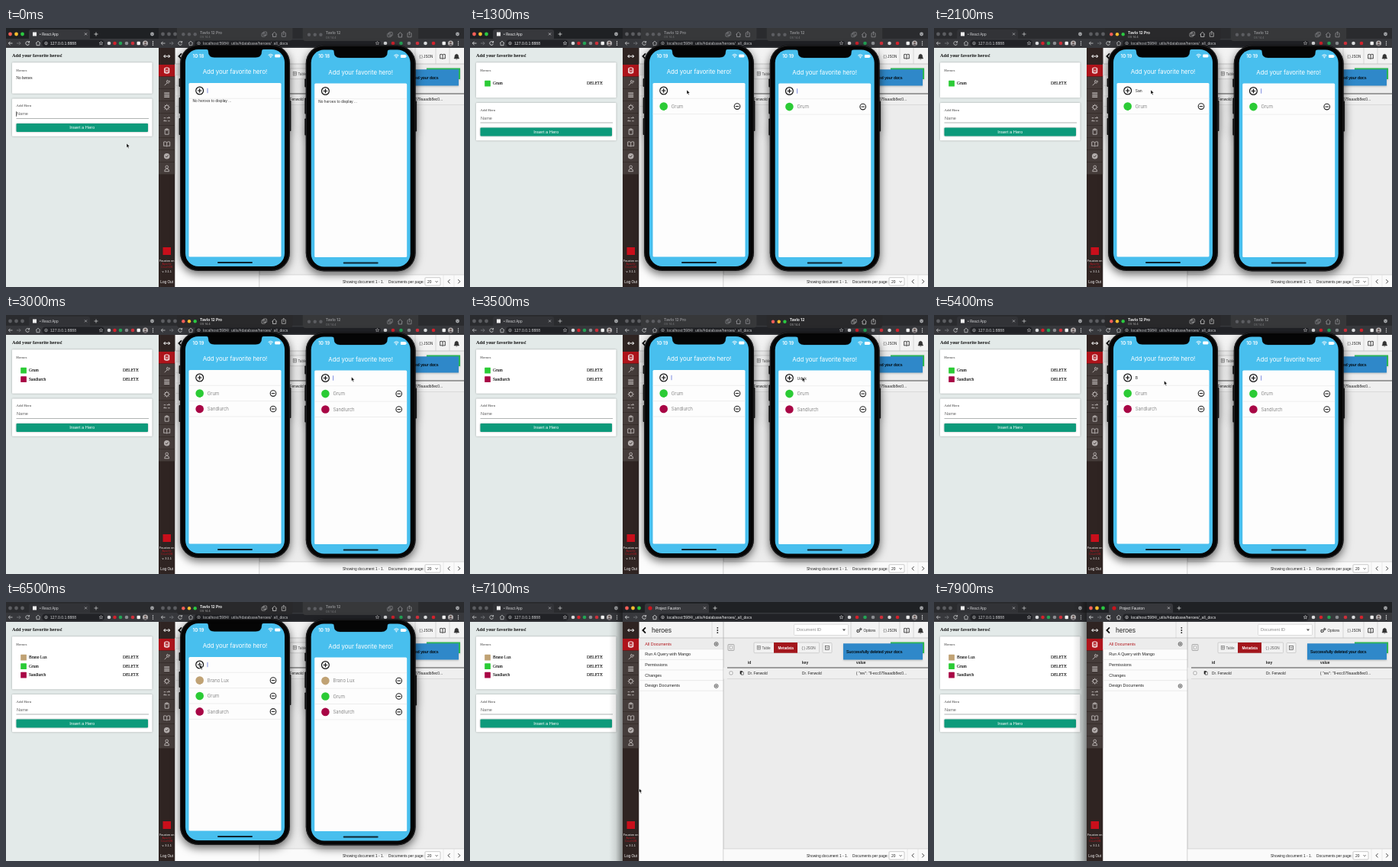
Animation of 600x339 px, one loop 8 s. Source, as an HTML page:

```html
<!DOCTYPE html>
<html lang="en">
<head>
<meta charset="utf-8">
<title>Hero list sync</title>
<style>
  html, body { margin: 0; width: 100%; height: 100%; overflow: hidden; background: #e3eae9; }
  svg { display: block; width: 600px; height: 339px; }
  text { font-family: "Liberation Sans", Arial, sans-serif; white-space: pre; }
  .serif text { font-family: "Liberation Serif", Times, serif; }
  .phone text { font-family: Inter, "Liberation Sans", sans-serif; }
  .card { filter: drop-shadow(0 .6px .8px rgba(0,0,0,.3)); }
  .body { filter: drop-shadow(0 4px 6px rgba(0,0,0,.6)); }
  .toast { filter: drop-shadow(0 1px 1px rgba(0,0,0,.2)); }
</style>
</head>
<body>
<svg id="stage" viewBox="0 0 600 339"></svg>
<script>
const LOOP = 8000, STEP = 100;
const stage = document.getElementById('stage');

// Timeline
const heroes = [
  { name: 'Brano Lux', color: '#c0a274', from: 6400, to: LOOP },
  { name: 'Grum', color: '#2bcb35', from: 1000, to: LOOP },
  { name: 'Sandlurch', color: '#a80645', from: 2800, to: LOOP },
  { name: 'Udek', color: '#4baed2', from: 3700, to: 4700 }
];
const typing = [
  { where: 'web', text: 'Grum', from: 200, pace: 150, to: 1000 },
  { where: 'p1', text: 'Sandlurch', from: 1900, pace: 80, to: 2800 },
  { where: 'p2', text: 'Udek', from: 3200, pace: 100, to: 3700 },
  { where: 'p1', text: 'Brano Lux', from: 5400, pace: 100, to: 6400 }
];
const focus = [[0, 'web'], [1400, 'p1'], [3100, 'p2'], [5100, 'p1'], [6900, 'fx']];
const mouse = [
  [0, 158, 151], [500, 158, 151], [800, 110, 130], [1000, 110, 130],
  [1300, 284, 81], [2300, 284, 81], [2600, 254, 82], [2800, 254, 82],
  [3000, 452.5, 81], [3400, 452.5, 81], [3600, 418, 82], [3800, 418, 82],
  [4200, 491.5, 155.5], [4500, 515, 143], [4700, 515, 143], [5000, 268, 82],
  [5100, 268, 82], [5400, 301.5, 86], [6100, 301.5, 86], [6300, 254, 82],
  [6500, 254, 82], [6800, 221.5, 244], [7200, 221.5, 244], [7800, 227.5, 17], [8000, 227.5, 17]
];

const lastAt = (list, t) => list.filter(k => k[0] <= t).pop();
const within = t => k => t >= k.from && t < k.to;
const typed = (where, t) => {
  const k = typing.filter(k => k.where === where).find(within(t));
  return k ? k.text.slice(0, 1 + Math.floor((t - k.from) / k.pace)) : '';
};
function mouseAt(t) {
  const a = lastAt(mouse, t), b = mouse[mouse.indexOf(a) + 1] || a;
  const u = b === a ? 0 : (t - a[0]) / (b[0] - a[0]);
  const e = u * u * (3 - 2 * u);
  return [a[1] + (b[1] - a[1]) * e, a[2] + (b[2] - a[2]) * e];
}

// Drawing helpers
const text = (x, y, s, size, fill, more = '') =>
  `<text x="${x}" y="${y}" font-size="${size}" fill="${fill}" ${more}>${s}</text>`;
const rect = (x, y, w, h, fill, r = 0, more = '') =>
  `<rect x="${x}" y="${y}" width="${w}" height="${h}" rx="${r}" fill="${fill}" ${more}/>`;
const dot = (x, y, r, fill, more = '') => `<circle cx="${x}" cy="${y}" r="${r}" fill="${fill}" ${more}/>`;
const line = (d, color, w = .8, fill = 'none') =>
  `<path d="${d}" stroke="${color}" stroke-width="${w}" fill="${fill}"/>`;
const move = (x, y, s, cls = '') => `<g class="${cls}" transform="translate(${x} ${y})">${s}</g>`;
const mid = 'text-anchor="middle"';
const bold = 'font-weight="700"';

const lights = (x, y, gap, r, on) =>
  ['#f45f57', '#f9bd2e', '#2bc840'].map((c, i) => dot(x + i * gap, y, r, on ? c : '#5c5d61')).join('');

function browser(x, w, on, tab, title, icon, url, exts) {
  const ink = on ? '#eeeff0' : '#d2d3d5';
  const end = x + w;
  return rect(x, 0, w, 14, on ? '#1f2124' : '#2a2b2e') +
    lights(x + 5.5, 8, 8, 2.4, on) +
    rect(tab[0], 2, tab[1], 14, on ? '#37383c' : '#323337', 3) +
    icon + text(tab[0] + 14, 9.8, title, 4.7, ink) +
    line(`M${tab[0] + tab[1] - 7} 6.4l3 3m0-3l-3 3`, ink, .6) +
    line(`M${tab[0] + tab[1] + 5.5} 8h5m-2.5-2.5v5`, ink, .7) +
    dot(end - 8.5, 8, 2.4, '#a9abae') + line(`M${end - 9.6} 7.5l1.1 1.1l1.1-1.1`, '#222', .6) +
    rect(x, 14, w, 12, '#37383c') +
    rect(x + 47, 15.5, exts[0] - x - 53, 9, '#212226', 4.5) +
    line(`M${x + 8.5} 20h-5m2-2.2l-2.2 2.2l2.2 2.2`, ink, .8) +
    line(`M${x + 14} 20h5m-2-2.2l2.2 2.2l-2.2 2.2`, '#7d7f83', .8) +
    line(`M${x + 30.2} 18.6a2.4 2.4 0 1 0 .3 2.1M${x + 30.6} 17v2h-2`, ink, .8) +
    line(`M${x + 39} 20l3-2.8l3 2.8M${x + 40} 19.5v3.2h4v-3.2`, ink, .7) +
    dot(x + 52.5, 20, 1.8, 'none', `stroke="${ink}" stroke-width=".6"`) +
    line(`M${x + 52.5} 19.5v1.5`, ink, .6) +
    text(x + 58, 21.8, url, 5.1, ink) +
    line(`M${exts[0] - 10.5} 17.6l.7 1.6h1.7l-1.4 1.1l.6 1.8l-1.6-1l-1.6 1l.6-1.8l-1.4-1.1h1.7z`, ink, .5) +
    exts.map((ex, i) => dot(ex, 20, 2.3,
      ['#d9dadc', '#d3222c', '#23a455', '#8b8d91', '#cc2f3a'][i % 5])).join('') +
    rect(end - 28.5, 17.8, 4.4, 4.4, '#f0f0f0', 1) +
    dot(end - 17.5, 20, 3.5, '#b5b2b3') + dot(end - 17.5, 19, 1.3, '#6b5752') +
    line(`M${end - 19.8} 22.6q2.3-3.4 4.6 0z`, '#473d42', .3, '#473d42') +
    [17.8, 20, 22.2].map(y => dot(end - 7.5, y, .7, ink)).join('');
}

function webApp(t, list, on) {
  const n = list.length;
  const top = 92.5 + (n ? 5.5 + 11.5 * (n - 1) : 0);
  const value = typed('web', t);
  const caretX = 14 + value.length * 3.1;
  const rows = n ? list.map((h, i) => {
    const y = 72.7 + i * 11.5;
    return rect(19.2, y - 3.9, 7.7, 7.7, h.color, .6) +
      text(30, y + 1.5, h.name, 5.5, '#111', 'stroke="#111" stroke-width=".12"') +
      text(153, y + 1.5, 'DELETE', 5.5, '#111', 'stroke="#111" stroke-width=".12"');
  }).join('') : text(13.3, 67, 'No heroes', 5.2, '#111');
  const form = rect(8, 0, 183.5, 49.3, '#fff', 1, 'class="card"') +
    text(13.3, 10.6, 'Add Hero', 5, '#333') +
    line('M13.5 26H187', '#8f9493', .7) +
    rect(13.5, 32.5, 172.5, 11, '#0d9a7b', 1, 'class="card"');
  const formText = text(14, 21.8, value || 'Name', 5.6, value ? '#111' : '#666') +
    text(99.7, 39.9, 'Insert a Hero', 5.7, '#fff', mid) +
    (on && (t < 200 || value) ? rect(caretX - .8, 16.8, .7, 6.5, '#222') : '');
  return rect(0, 26, 200, 313, '#e3eae9') +
    browser(0, 200, on, [30, 80], '• React App', rect(35, 5.5, 5, 5, '#f1f1f1'),
      '127.0.0.1:8888', [135, 142.5, 150, 158, 166]) +
    `<g class="serif">` + text(8, 38.2, 'Add your favorite heros!', 6.25, '#111', bold) +
    rect(8, 45.3, 183.5, top - 52, '#fff', 1, 'class="card"') +
    text(13.3, 56.5, 'Heroes', 5, '#333') + rows + move(0, top, form) + '</g>' +
    move(0, top, formText);
}

function sidebar() {
  const c = '#b3adac';
  const icons = [
    'M-4 0h8m-6-2l-2 2l2 2m4-4l2 2l-2 2',
    'M-3-3q3-1.6 6 0v6q-3 1.6-6 0zM-3-1q3 1.6 6 0M-3 1.5q3 1.6 6 0',
    'M-3 3.5L1-.5M3.5-2.5l-2 1l-.5-2a2 2 0 1 0 2.5 1',
    'M-3.5-2.5h7M-3.5 0h7M-3.5 2.5h7',
    'M2.6 0a2.6 2.6 0 1 0-5.2 0a2.6 2.6 0 1 0 5.2 0M0-4v2M0 2v2M-4 0h2M2 0h2M-2.8-2.8l1.3 1.3M1.5 1.5l1.3 1.3M2.8-2.8l-1.3 1.3M-1.5 1.5l-1.3 1.3',
    'M-4-2h2.5m1.5 0h4m-1.5-1.5l1.5 1.5M-4 2h4m1.5 0h2.5m-6.5-1.5l-1.5 1.5',
    'M-2.5-3h5v6.5h-5zM-1-3.8h2v2h-2z',
    'M0-2q-2-1.5-4-.6v5.4q2-.8 4 .4q2-1.2 4-.4v-5.4q-2-.9-4 .6v5',
    'M-1.7 0l1.3 1.4l2.2-2.6',
    'M1.8-1.8a1.8 1.8 0 1 0-3.6 0a1.8 1.8 0 1 0 3.6 0M-3 4q0-3.5 3-3.5t3 3.5z'
  ];
  return rect(200, 26, 21.5, 313, '#2f2422') +
    icons.map((d, i) => {
      const y = i ? 39.7 + i * 16 : 37;
      return (i ? rect(200, y - 7.7, 21.5, 15.4, i === 1 ? '#ae141b' : '#453c3a') : '') +
        (i === 8 ? dot(210.7, y, 3.8, c) : '') +
        move(210.7, y, line(d, i === 8 ? '#453c3a' : i < 2 ? '#fff' : c, i === 3 ? 1.5 : 1));
    }).join('') +
    rect(205.5, 287, 10.5, 10, '#c90f1b') +
    text(210.7, 305.8, 'Fauxton on', 3.9, '#fff', mid) +
    text(210.7, 310, 'Apache', 3.6, '#b21822', mid) + text(210.7, 314, 'CouchDB', 3.6, '#b21822', mid) +
    text(210.7, 319.5, 'v. 3.1.1', 3.9, '#fff', mid) +
    text(210.7, 334, 'Log Out', 4.7, '#fff', mid);
}

const cog = (x, y, r) => dot(x, y, r, 'none', 'stroke="#444" stroke-width="1.2" stroke-dasharray="1 .4"') +
  dot(x, y, r * .8, 'none', 'stroke="#444" stroke-width=".6"');
const plus = (x, y, r, color, w) => dot(x, y, r, 'none', `stroke="${color}" stroke-width="${w}"`) +
  line(`M${x - r * .55} ${y}h${r * 1.1}M${x} ${y - r * .55}v${r * 1.1}`, color, w);
const box = (x, y, w, h, fill, stroke = '#aaa', r = 1) =>
  rect(x, y, w, h, fill, r, `stroke="${stroke}" stroke-width=".6"`);

function docsPage(on) {
  const ink = '#222', rule = '#c4c4c4';
  const menu = ['All Documents', 'Run A Query with Mango', 'Permissions', 'Changes', 'Design Documents'];
  return browser(200, 400, on, [229, 84], 'Project Fauxton', dot(236, 8, 2.6, '#c9151e'),
    'localhost:5984/_utils/#database/heroes/_all_docs',
    [497, 507, 517.5, 528, 539, 549.5, 560]) +
    rect(221.5, 26, 378.5, 313, '#ececec') + rect(221.5, 26, 378.5, 21, '#f3f3f3') + sidebar() +
    rect(221.5, 47, 110.5, 292, '#fcfcfc') + rect(221.5, 47.3, 110.5, 14.5, '#ececec') +
    line('M230 33.4l-3.6 3.6l3.6 3.6', '#111', 1.8) +
    text(238, 40.3, 'heroes', 8.5, ink) + line('M317 26V47', '#d0d0d0', .6) +
    [33.8, 37, 40.2].map(y => dot(324.3, y, .9, '#222')).join('') +
    menu.map((s, i) => text(229.3, 56.8 + i * 13.6, s, 5.4, i ? ink : '#b3181d') +
      line(`M221.5 ${61.8 + i * 13.6}H332`, '#ddd', .6)).join('') +
    plus(322.6, 55, 2.5, '#555', .9) + plus(322.6, 110, 2.5, '#555', .9) +
    line('M221.5 47H600', '#b5b5b5', .7) + line('M332 26V339', '#aaa', .7) +
    // header controls
    box(424.5, 29.3, 71, 14.2, '#fff', '#c8c8c8') + text(428, 38.4, 'Document ID', 5.5, '#8b8b8b') +
    line('M488 35.5h4l-2 2.4z', '#555', .1, '#555') +
    line('M499 26V47M536 26V47M563 26V47M581 26V47', rule, .6) +
    cog(508.5, 38, 1.7) + cog(511.7, 35.5, 1.1) + text(515.5, 38.8, 'Options', 4.6, ink) +
    text(541.5, 38.8, '{ } JSON', 4.6, ink) +
    line('M572 35q-1.6-1.1-3.3-.4v5.4q1.7-.7 3.3.4q1.6-1.1 3.3-.4v-5.4q-1.7-.7-3.3.4v5', '#333', .9) +
    line('M587 40q1-1.2 1-3.3q0-2 2.3-2.4q2.3.4 2.3 2.4q0 2.1 1 3.3zM589.5 41h1.6', '#333', .6, '#333') +
    // table
    box(338, 55.5, 8, 8, '#e4e4e4', '#888') + box(340.4, 57.9, 3.2, 3.2, '#fff', '#999', 0) +
    box(372, 53, 85.5, 13.7, '#f1f1f1', '#bbb') + rect(398, 53, 31, 13.7, '#a3161c') +
    box(376.2, 57.6, 4.4, 4.4, 'none', '#666', 0) + line('M376.2 59.6h4.4M378.3 57.6v4.4', '#666', .5) +
    text(382.5, 61.7, 'Table', 4.7, '#555') +
    text(413.6, 61.7, 'Metadata', 4.7, '#fff', mid + ' ' + bold) + text(434.5, 61.7, '{ } JSON', 4.7, '#555') +
    box(462, 53.5, 12, 13, '#f1f1f1', '#bbb') + box(465.6, 57.6, 4.8, 4.8, 'none', '#333', 0) +
    line('M466.5 60h3', '#333', .7) +
    [[364, 'id'], [435, 'key'], [506, 'value']].map(([x, s]) => text(x, 81.3, s, 4.9, ink, bold)).join('') +
    rect(332.3, 86, 267.7, 14.5, '#efefef') + line('M337 86H600', '#4a4a4a', 1) +
    line('M337 100.5H600', '#cfcfcf', .6) +
    box(340, 91, 4, 4, '#fff', '#777') +
    rect(353.7, 90.2, 3.2, 4.2, '#222', .4) + box(355.3, 91.7, 2.8, 3.4, '#fff', '#222', 0) +
    text(364, 94.6, 'Dr. Fenwold', 4.8, ink) + text(435, 94.6, 'Dr. Fenwold', 4.8, ink) +
    text(506, 94.6, '{ "rev": "9-ecc079aaadb8ec0...', 4.9, ink) +
    `<g class="toast">${rect(551, 52.5, 44, 14.5, '#2bb554')}${rect(489, 54.3, 104, 21.2, '#2f88c9')}</g>` +
    text(493, 66.6, 'Successfully deleted your docs', 5.35, '#000', 'stroke="#000" stroke-width=".1"') +
    // footer
    rect(332.3, 323, 267.7, 16, '#fafafa') + line('M332 323H600', rule, .6) +
    text(441, 333.8, 'Showing document 1 - 1.', 4.9, ink) + text(501, 333.8, 'Documents per page:', 4.9, ink) +
    box(549, 326.7, 20, 10.3, '#fff') + text(552, 333.8, '20', 4.9, ink) +
    line('M562.5 331.2l1.6 1.7l1.6-1.7', '#333', .7) + line('M573 323V339M587 323V339', '#ddd', .6) +
    line('M581.5 329.2l-2.5 2.6l2.5 2.6M592.3 329.2l2.5 2.6l-2.5 2.6', '#333', .9);
}

// The front window darkens the edge of the one beside it
const edgeShadow = `<linearGradient id="edge"><stop offset="0" stop-opacity="0"/>` +
  `<stop offset=".5" stop-opacity=".1"/><stop offset="1" stop-opacity=".42"/></linearGradient>` +
  rect(182, 0, 18, 339, 'url(#edge)');

function titleBar(name, on) {
  const ink = on ? '#f0f0f0' : '#898a8d', icon = on ? '#c8c8c8' : '#98999c';
  return rect(224, -6, 151.5, 22.5, on ? '#29292b' : '#37383a', 4) +
    lights(232.3, 8.3, 7.7, 2.2, on) +
    text(254, 7.8, name, 5, ink, bold) + text(254, 13.2, 'OS 14.4', 3.8, on ? '#aaa' : '#77787b') +
    box(335, 6.6, 4.6, 4.6, 'none', icon, .8) + box(337, 5, 4.6, 4.6, 'none', icon, .8) +
    line('M348.5 8.4l3.2-3l3.2 3M349.5 8v3.5h4.4v-3.5', icon, .8) +
    line('M362.3 6.3h-1v5h5v-5h-1M363.8 9v-4.5m-1.3 1.2l1.3-1.3l1.3 1.3', icon, .7);
}

function phone(id, name, t, list, on) {
  const value = typed(id, t);
  const blink = t % 800 < 400;
  const caret = !value && blink === (id === 'p1');
  const rows = list.length ? list.map((h, i) => {
    const y = 102.6 + i * 20.4;
    return dot(253.7, y, 5.3, h.color) + text(263.8, y + 2.1, h.name, 6, '#666', 'font-weight="300"') +
      dot(350, y, 3.8, 'none', 'stroke="#222" stroke-width="1.1"') +
      line(`M347.8 ${y}h4.4`, '#222', 1.1) + line(`M239.5 ${y + 10}H360.5`, '#e2e2e2', .6);
  }).join('') : text(244.5, 97.2, 'No heroes to display ...', 4.7, '#222');
  const buttons = [[226.6, 66, 11], [226.6, 91, 21], [226.6, 118, 22], [371, 95, 40]]
    .map(([x, y, h]) => rect(x, y, 2.4, h, '#111', .8)).join('');
  return titleBar(name, on) +
    `<g class="body">${buttons}${rect(228, 22, 144, 296, '#050505', 24)}</g>` +
    rect(228.7, 22.7, 142.6, 294.6, 'none', 23.5, 'stroke="#3c3c3e" stroke-width=".6"') +
    rect(235, 28, 130, 284, '#48bfee', 17) +
    line('M262 27.5q3 .3 3 3q0 8 8 8h54q8 0 8-8q0-2.7 3-3z', '#050505', .2, '#050505') +
    text(252, 38.8, t < 600 ? '10:18' : '10:19', 6, '#fff', mid + ' font-weight="600"') +
    line('M343.6 35.6q3.1-2.7 6.2 0M344.9 37q1.8-1.5 3.6 0', '#fff', 1) + dot(346.7, 38.3, .8, '#fff') +
    rect(352.2, 34.6, 7, 3.9, '#fff', 1) + rect(359.6, 35.7, .7, 1.6, '#fff') +
    text(300, 60.2, 'Add your favorite hero!', 7.8, '#fff', mid) +
    rect(239.5, 72, 121, 227.5, '#fdfdfd', 1.5) +
    plus(253.7, 82, 4.9, '#111', 1.2) + line('M239.5 92.3H360.5', '#e2e2e2', .6) +
    (value ? text(263.8, 84, value, 5, '#222') : '') +
    (caret ? rect(263.6, 78.8, .8, 6.4, '#5f70d8') : '') + rows +
    rect(277, 306, 46, 2, '#0d2530', 1);
}

function scene(t) {
  const list = heroes.filter(within(t));
  const front = lastAt(focus, t)[1];
  const [mx, my] = mouseAt(t);
  const over = front === 'fx' ? edgeShadow :
    move(0, 0, phone('p1', 'Tavlo 12 Pro', t, list, front === 'p1'), 'phone') +
    move(164.7, .5, phone('p2', 'Tavlo 12', t, list, front === 'p2'), 'phone');
  return docsPage(front === 'fx') + webApp(t, list, front === 'web') + over +
    move(mx, my, line('M0 0V5.6L1.3 4.5L2.2 6.6L3.2 6.2L2.3 4.1H4z', '#fff', .5, '#000'));
}

const start = performance.now();
let shown = -1;
function tick(now) {
  const t = Math.floor((Math.max(0, now - start) % LOOP) / STEP) * STEP;
  if (t !== shown) stage.innerHTML = scene(shown = t);
  requestAnimationFrame(tick);
}
tick(start);
</script>
</body>
</html>
```
